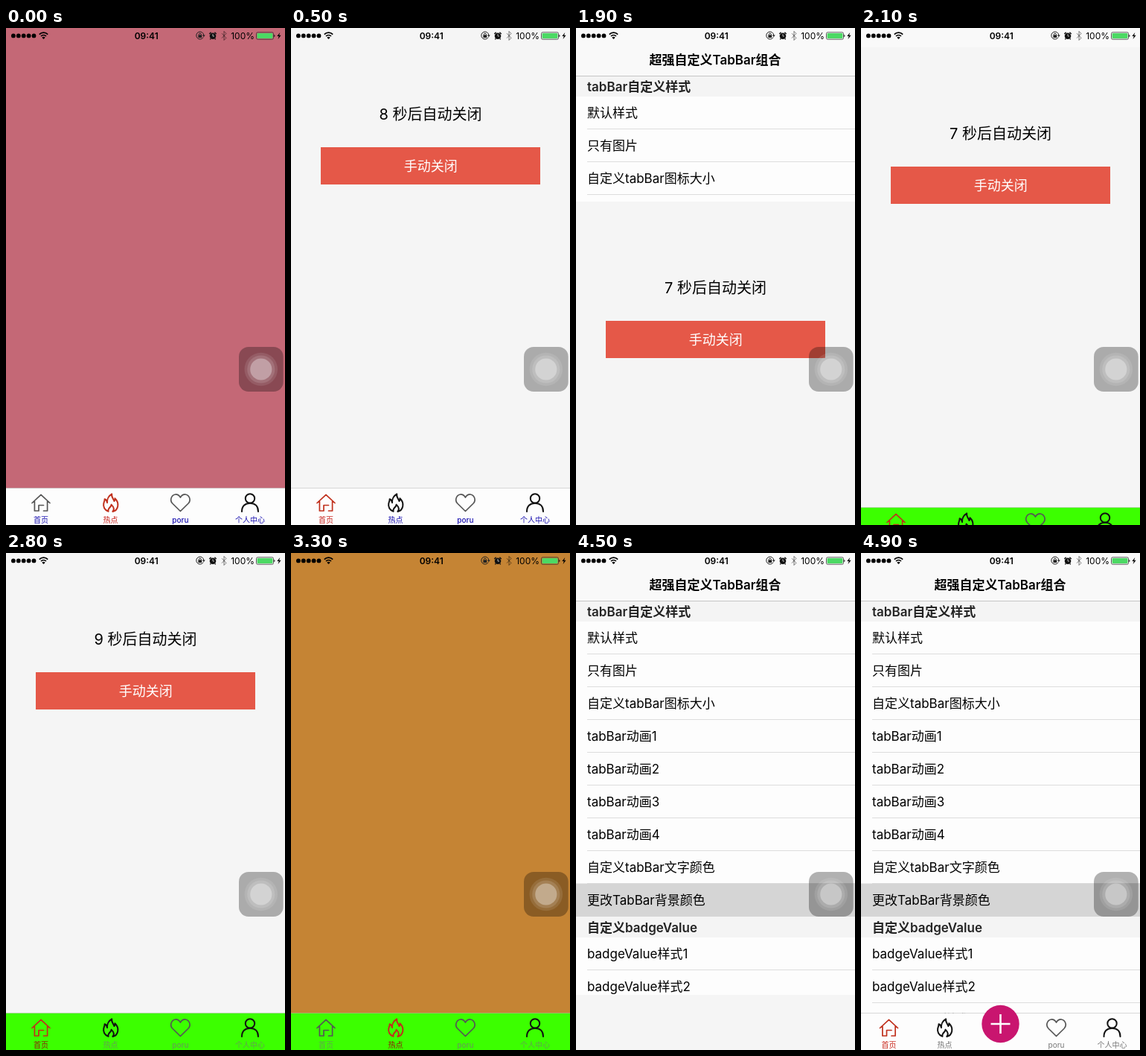
An HTML page for the animation above (5000 ms loop, 375 by 667 pixels).

```html
<!DOCTYPE html>
<html lang="zh-CN">
<head>
<meta charset="utf-8">
<title>TabBar</title>
<style>
html, body { margin: 0; width: 100%; height: 100%; overflow: hidden; background: #f5f5f5; }
svg { display: block; width: 375px; height: 667px; font-family: Inter, "Noto Sans CJK SC", "Noto Sans CJK", sans-serif; }
</style>
</head>
<body>
<svg id="stage" viewBox="0 0 375 667"></svg>
<script>
const LOOP = 5000, STEP = 100, HEIGHT = 667, BAR_TOP = 617.5;
const stage = document.getElementById('stage');

const rect = (x, y, w, h, fill, extra = '') =>
  `<rect x="${x}" y="${y}" width="${w}" height="${h}" fill="${fill}" ${extra}/>`;
const circle = (x, y, r, fill, extra = '') =>
  `<circle cx="${x}" cy="${y}" r="${r}" fill="${fill}" ${extra}/>`;
const path = (d, stroke, width, extra = '') =>
  `<path d="${d}" fill="none" stroke="${stroke}" stroke-width="${width}" ${extra}/>`;
const text = (str, x, y, size, fill = '#000', anchor = 'start', weight = 400) =>
  `<text x="${x}" y="${y}" font-size="${size}" fill="${fill}" text-anchor="${anchor}" font-weight="${weight}">${str}</text>`;

// Tab icons, drawn around their own centre.
const round = 'stroke-linejoin="round" stroke-linecap="round"';
const icons = {
  home: c => path('M-12 .5L0-10.7L12 .5M-8.6-2V11H-3V3.5H3.5M3.5 11H8.6V-2', c, 1.7, round),
  flame: c => path('M-3 11.8C-8 10-10.3 5.5-9.3 1C-8.9-1-7.8-2.5-8-4.8C-6-4-4.8-2-4.5 0C-5-5-2-9.5 1.6-11.6C.8-7 4-5 4.8-2' +
    'C5.8-3 6-4.2 5.8-5.8C8.8-3 10.3 1.2 9.6 5C8.8 8.8 6 11.4 2.8 12C5 9.5 4.4 6 1 2.6C.8 5.2-.8 5.8-2.4 8C-3.2 9.4-3.4 10.6-3 11.8Z', c, 2, round),
  heart: c => path('M0 11.5L-10.7 1C-14.5-3-12.5-10-7-11C-4-11.3-1.5-9.5 0-7C1.5-9.5 4-11.3 7-11C12.5-10 14.5-3 10.7 1Z', c, 1.7, round),
  person: c => circle(0, -5.6, 6.2, 'none', `stroke="${c}" stroke-width="2"`) +
    path('M-11 12C-11 4.5-6.5.8 0 .8S11 4.5 11 12', c, 2, round),
};

const tabs = [
  { icon: 'home', label: '首页', color: '#555' },
  { icon: 'flame', label: '热点', color: '#111' },
  { icon: 'heart', label: 'poru', color: '#555' },
  { icon: 'person', label: '个人中心', color: '#111' },
];

const themes = {
  main: { bar: '#fdfdfd', label: '#777', active: '#c8281c', centers: [37.5, 112.5, 262.5, 337.5] },
  tinted: { bar: '#fdfdfd', label: '#1a12b0', active: '#c8201a', centers: [47, 140.6, 234.4, 328], page: '#c46876' },
  green: { bar: '#3cff00', label: '#63a050', active: '#8e1a08', centers: [47, 140.6, 234.4, 328], page: '#c58434' },
};

function tabBar(theme, selected) {
  const items = tabs.map((tab, i) => {
    const x = theme.centers[i], on = i === selected;
    return `<g transform="translate(${x} 637)">${icons[tab.icon](on ? '#c0301c' : tab.color)}</g>` +
      text(tab.label, x, 663.5, 10, on ? theme.active : theme.label, 'middle', theme === themes.main ? 400 : 500);
  });
  return rect(0, BAR_TOP, 375, 49.5, theme.bar) + rect(0, BAR_TOP - .5, 375, .5, '#b2b2b2') + items.join('');
}

const sections = [
  { title: 'tabBar自定义样式', rows: ['默认样式', '只有图片', '自定义tabBar图标大小', 'tabBar动画1', 'tabBar动画2',
    'tabBar动画3', 'tabBar动画4', '自定义tabBar文字颜色', '更改TabBar背景颜色'] },
  { title: '自定义badgeValue', rows: ['badgeValue样式1', 'badgeValue样式2', 'badgeValue样式3'] },
];

function listPage(selectedRow) {
  let y = 64, out = rect(0, 0, 375, HEIGHT, '#fdfdfd');
  for (const { title, rows } of sections) {
    out += rect(0, y, 375, 28, '#f4f4f4') + text(title, 15, y + 21, 17, '#232323', 'start', 600);
    y += 28;
    rows.forEach((row, i) => {
      const on = row === selectedRow;
      if (on) out += rect(0, y - .5, 375, 44.5, '#d5d5d5');
      else if (i < rows.length - 1) out += rect(15, y + 43.4, 360, .6, '#c8c8c8');
      out += text(row, 15, y + 28, 17);
      y += 44;
    });
  }
  out += rect(0, 0, 375, 64, '#f9f9f9') + rect(0, 64, 375, .6, '#a8a8a8');
  out += text('超强自定义TabBar组合', 187, 48.5, 17, '#000', 'middle', 600);
  out += tabBar(themes.main, 0) + circle(187.5, 632, 25.2, '#c9156f');
  return out + path('M174.5 632h26M187.5 619v26', '#fff', 2.6);
}

function modalPage({ theme, tab, seconds, offset }) {
  const home = tab === 0;
  let out = rect(0, 0, 375, HEIGHT, home ? '#f5f5f5' : theme.page);
  if (home) {
    out += text(`${seconds} 秒后自动关闭`, 187.5, 122.5, 20, '#000', 'middle');
    out += rect(40, 160, 295, 50, '#e55848') + text('手动关闭', 187.8, 191.7, 18, '#fff', 'middle');
  }
  return `<g transform="translate(0 ${offset})">${out}${tabBar(theme, tab)}</g>`;
}

function statusBar() {
  let out = '';
  for (let i = 0; i < 5; i++) out += circle(9.9 + i * 6.9, 10.4, 2.9, '#000');
  out += path('M44.8 8.6a8 8 0 0 1 11.4 0M47 11a5 5 0 0 1 7 0', '#000', 1.7);
  out += '<path d="M50.5 15l-2.2-2.3a3.2 3.2 0 0 1 4.4 0z"/>';
  out += text('09:41', 188.7, 14.7, 12, '#000', 'middle', 600);
  out += path('M265.2 12.4a5 5 0 1 1 .6-2.6M259.3 9.7v-1a1.5 1.5 0 0 1 3 0v1', '#222', 1) + rect(258.4, 9.3, 4.8, 3.7, '#222');
  out += '<path d="M263.8 9.4h4l-2 2.6z" fill="#222"/>';
  out += circle(278, 10.7, 4.3, '#111') + path('M273.3 8l2.3-2.3M282.7 8l-2.3-2.3M275.3 14.2l-1 1.2M280.7 14.2l1 1.2', '#111', 1.4);
  out += path('M278 8v3h2', '#ddd', .8);
  out += path('M290 7.2l6 6.2l-3 3V4.4l3 3l-6 6.2', '#000', 1, 'opacity=".5"');
  out += text('100%', 334, 14.7, 12, '#000', 'end');
  out += rect(336.5, 5.8, 23, 9.4, 'none', 'rx="1.8" stroke="#333" stroke-width=".8"') + rect(337.6, 6.9, 20.8, 7.2, '#4cd964', 'rx="1"');
  out += '<path d="M360.4 8.8a1.9 1.9 0 0 1 0 3.4zM368.3 6l-4 5.1h2.4l-1.1 4l4-5.3h-2.5z"/>';
  return out;
}

const touchButton = rect(313, 428, 59.7, 60, '#000', 'rx="13" opacity=".3"') +
  circle(342.8, 458, 22.3, '#fff', 'opacity=".1"') +
  circle(342.8, 458, 18.6, '#fff', 'opacity=".13"') +
  circle(342.8, 458, 14.6, '#fff', 'opacity=".33"');
const overlay = statusBar() + touchButton;

const within = (t, a, b) => t >= a && t < b;
const settle = (t, start) => t <= start ? 0 : 1 - Math.exp(-(t - start) * .011);
const slide = shown => Math.round(HEIGHT * (1 - shown));

function modalState(t) {
  if (t < 1800) {
    return { theme: themes.tinted, tab: t < 200 ? 1 : 0, seconds: t < 900 ? 8 : 7, offset: slide(1 - settle(t, 1001)) };
  }
  const onFlame = within(t, 2400, 2700) || within(t, 3100, 3600);
  const seconds = t < 2700 ? 7 : t < 3400 ? 9 : t < 3900 ? 8 : 7;
  return { theme: themes.green, tab: onFlame ? 1 : 0, seconds, offset: slide(settle(t, 1804.4) - settle(t, 4300)) };
}

function render(t) {
  const modal = modalState(t);
  const rows = sections[0].rows;
  const hidden = modal.offset > HEIGHT - 3;
  stage.innerHTML = listPage(rows[t < 1800 ? 7 : 8]) + (hidden ? '' : modalPage(modal)) + overlay;
}

// The screen advances in discrete steps, so redraw only on those.
const begin = performance.now();
let last = -1;
function tick() {
  const elapsed = (performance.now() - begin) % LOOP;
  const t = Math.floor(elapsed / STEP) * STEP;
  if (t !== last) render(last = t);
  requestAnimationFrame(tick);
}
tick();
</script>
</body>
</html>
```
